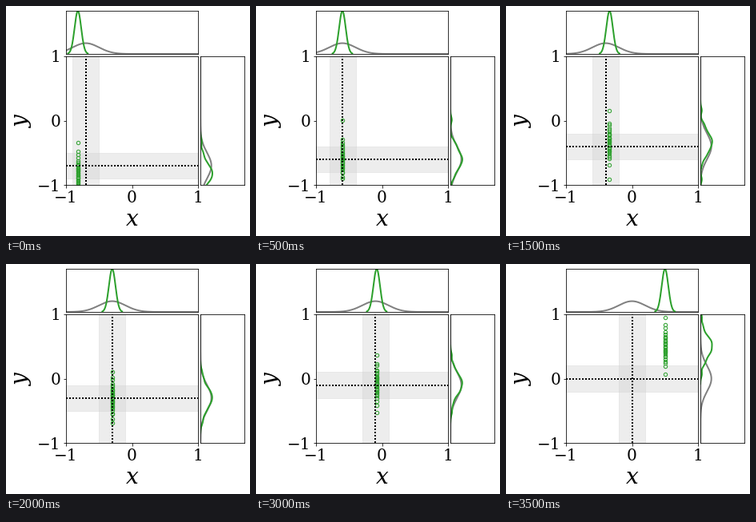
Animation of 305x288 px, one loop 6 s. Source, as a matplotlib script:

```python
import numpy as np
import matplotlib.pyplot as plt
from matplotlib.animation import FuncAnimation

W, H, DPI = 305, 288, 72
BANDWIDTH = 0.05
SPREAD = 0.2
SAMPLES = 30
COLUMN_X = [-0.82, -0.6, -0.48, -0.34, -0.3, -0.265, -0.08, 0.5]
LAST = len(COLUMN_X) - 1
GREEN = "tab:green"

plt.rcParams.update({
    "font.family": "DejaVu Serif",
    "mathtext.fontset": "dejavuserif",
    "font.size": 20,
    "axes.labelsize": 28,
})


def gauss(x, mean, sigma):
    return np.exp(-0.5 * ((x - mean) / sigma) ** 2) / (sigma * np.sqrt(2 * np.pi))


def density(samples):
    """Kernel density estimate, cut three bandwidths beyond the samples."""
    margin = 3 * BANDWIDTH
    grid = np.linspace(samples.min() - margin, samples.max() + margin, 200)
    return grid, gauss(grid[:, None], samples, BANDWIDTH).mean(axis=1)


def sample_column(center, seed):
    """Jittered, near-normal samples spread evenly over the quantiles."""
    jitter = np.random.default_rng(seed).uniform(0.1, 0.9, SAMPLES)
    u = (np.arange(SAMPLES) + jitter) / SAMPLES
    return center + SPREAD * np.log(u / (1 - u)) / 1.8


def add_axes(left, top, right, bottom):
    return fig.add_axes([left / W, 1 - bottom / H, (right - left) / W, (bottom - top) / H])


fig = plt.figure(figsize=(W / DPI, H / DPI), dpi=DPI, facecolor="white")
main = add_axes(75, 63, 240, 224)
top = add_axes(75, 6, 240, 60)
side = add_axes(243, 63, 298, 224)


def draw(i):
    step = min(i, LAST)
    mean = (step - LAST) / 10
    x = COLUMN_X[step]
    ys = sample_column(x, step)

    for ax in (main, top, side):
        ax.clear()

    band = dict(color="lightgray", alpha=0.4)
    line = dict(color="black", ls=(0, (1, 1)), lw=2)
    main.axvspan(mean - SPREAD, mean + SPREAD, **band)
    main.axhspan(mean - SPREAD, mean + SPREAD, **band)
    main.axvline(mean, **line)
    main.axhline(mean, **line)
    main.plot(np.full(SAMPLES, x), ys, "o", ms=4.4, mew=1, mfc="none", mec=GREEN, zorder=1.5)
    main.set(xlim=(-1, 1), ylim=(-1, 1), xticks=[-1, 0, 1], yticks=[-1, 0, 1],
             xticklabels=["−1", "0", "1"], yticklabels=["−1", "0", "1"],
             xlabel="$x$", ylabel="$y$")

    grid = np.linspace(-1, 1, 400)
    prior = gauss(grid, mean, SPREAD)
    top.plot(grid, prior, color="gray", lw=2)
    top.plot(*density(np.array([x])), color=GREEN, lw=2)
    side.plot(prior, grid, color="gray", lw=2)
    side.plot(*density(ys)[::-1], color=GREEN, lw=2)
    top.set(xlim=(-1, 1), ylim=(0, 8), xticks=[], yticks=[])
    side.set(xlim=(0, 8), ylim=(-1, 1), xticks=[], yticks=[])
    return []


anim = FuncAnimation(fig, draw, frames=12, interval=500, init_func=lambda: draw(0),
                     repeat=True, repeat_delay=0)
plt.show()
```
